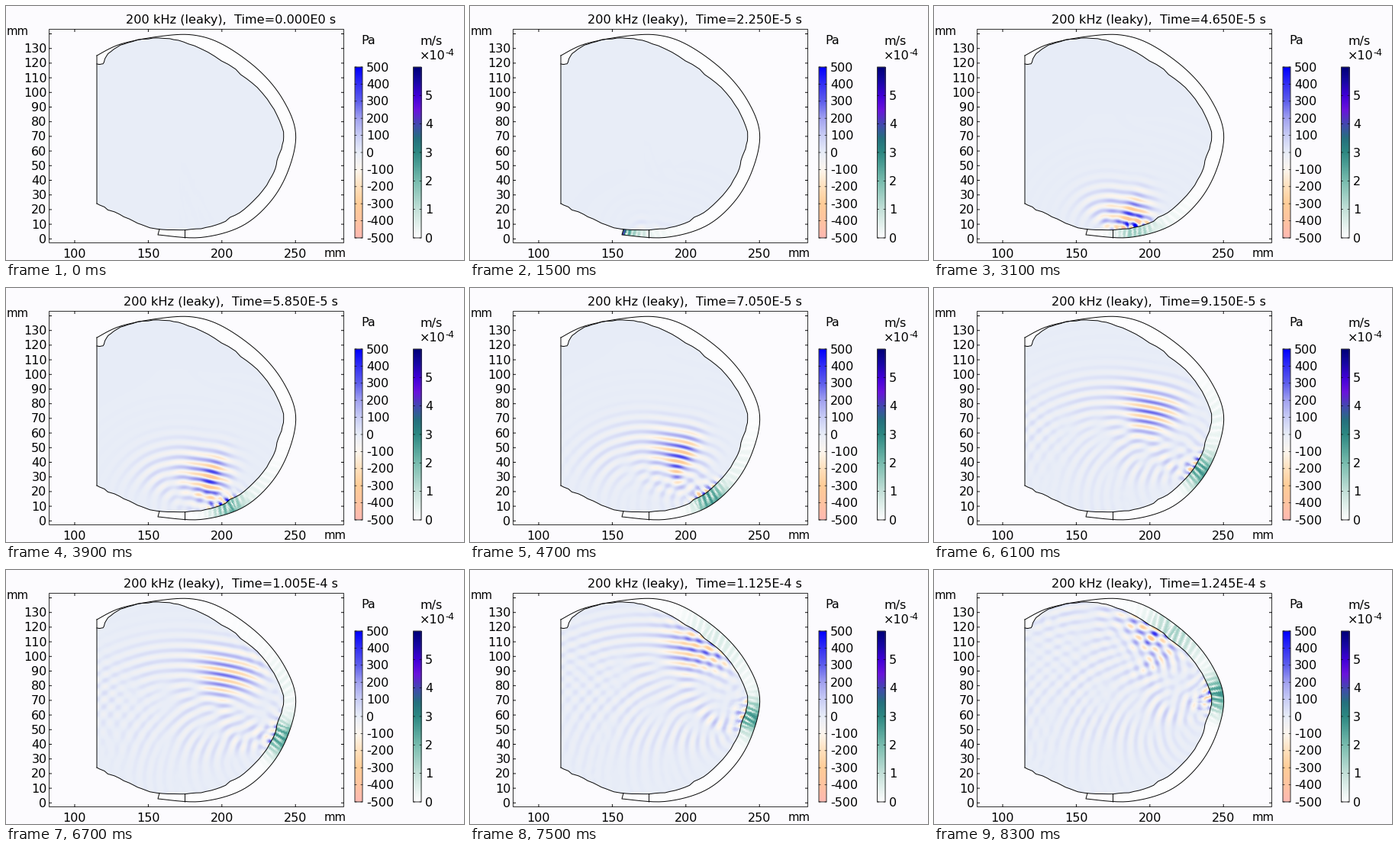
A matplotlib script that plays this animation: 600 by 333 pixels, repeating every 8.4 s.

```python
import numpy as np
import matplotlib.pyplot as plt
from matplotlib.animation import FuncAnimation
from matplotlib.colors import LinearSegmentedColormap
from matplotlib.path import Path
from matplotlib.patches import Polygon, Rectangle

W, H, FRAMES, STEP_US = 600, 333, 84, 1.5
INK = "#0a0a0a"
rng = np.random.default_rng(4)


def gauss(x, sigma):
    return np.exp(-.5 * (x / sigma)**2)


def ramp(x, a, b):
    u = np.clip((x - a) / (b - a), 0, 1)
    return u * u * (3 - 2 * u)


# ---- geometry, in stage pixels ----
def smooth(pts, n=8):
    """Catmull-Rom curve through the points."""
    pts = np.array(pts, float)
    p = np.vstack([pts[:1], pts, pts[-1:]])
    u = np.linspace(0, 1, n, endpoint=False)[:, None]
    out = []
    for a, b, c, d in zip(p, p[1:], p[2:], p[3:]):
        out.append(.5 * (2 * b + (c - a) * u + (2 * a - 5 * b + 4 * c - d) * u**2
                         + (3 * b - a - 3 * c + d) * u**3))
    return np.vstack(out + [pts[-1:]])


outer = smooth([(119, 65), (150, 50), (200, 40), (245, 38), (285, 51), (331, 84),
                (363, 123), (379.5, 167), (370, 215), (346, 257), (308, 289),
                (255, 303.5), (199, 300)])
outer = np.vstack([outer, [(201, 292.5)]])

# the inner wall is slightly rough
inner = smooth([(119, 76), (127, 75), (137, 60), (166, 46), (207, 42.5), (247, 52),
                (300, 83), (342, 121), (363, 165), (357, 197), (345, 229),
                (312, 266), (275, 287), (235, 293.5), (190, 291), (155, 276),
                (119, 259)], 6)
inner[1:-1] += rng.normal(0, .5, inner[1:-1].shape)

# ---- grid: one cell per pixel ----
X0, X1, Y0, Y1 = 117, 382, 35, 307
X, Y = np.meshgrid(np.arange(X0, X1) + .5, np.arange(Y0, Y1) + .5)
fluid = Path(inner).contains_points(np.c_[X.ravel(), Y.ravel()])
fluid = fluid.reshape(X.shape).astype(float)


def wall_coords():
    """Distance to the inner wall and arc length along it from the wedge."""
    cum = np.r_[0, np.cumsum(np.hypot(*np.diff(inner, axis=0).T))]
    start = cum[np.argmin(np.hypot(inner[:, 0] - 200, inner[:, 1] - 292.5))]
    dist, arc = np.full(X.shape, 1e9), np.zeros(X.shape)
    for c in np.arange(0, cum[-1], 1.0):
        px, py = np.interp(c, cum, inner[:, 0]), np.interp(c, cum, inner[:, 1])
        d2 = (X - px)**2 + (Y - py)**2
        near = d2 < dist
        dist[near] = d2[near]
        arc[near] = start - c
    return np.sqrt(dist), arc


D, S = wall_coords()

# ---- pressure wave in the fluid ----
SPEED, FREQ, SUB = 2.8, .21, 7      # px/us, MHz, steps per frame
GROUP = 2.28                        # speed of the packet in the shell


def crest(t):
    return 62 + GROUP * (t - 46.5)


# arc position, peak time, direction, half width, duration, strength, phase
SOURCES = [(26, 36, (0, 0), 4, 9, .5, 0),
           (57, 42.5, (.22, -.975), 18, 8.5, 1, 0)]
for s in range(75, 250, 17):
    SOURCES.append((s, 46.5 + (s - 62) / GROUP, (0, 0), 4, 6, .4,
                    rng.uniform(0, 2 * np.pi)))


def simulate():
    dt = STEP_US / SUB
    lam = SPEED * dt

    def around(a):
        return (np.roll(a, 1, 0) + np.roll(a, -1, 0)
                + np.roll(a, 1, 1) + np.roll(a, -1, 1))

    count = around(fluid)
    damp = .5 * .15 * lam * (4 - count) * fluid
    drives = []
    for s, t0, (dx, dy), width, dur, amp, phase in SOURCES:
        w = amp * gauss(S - s, width) * gauss(D, 1) * fluid
        idx = np.nonzero(w > .004)
        x, y, w = X[idx], Y[idx], w[idx]
        along = (x - np.average(x, weights=w)) * dx + (y - np.average(y, weights=w)) * dy
        drives.append((idx, w, t0 + along / SPEED, dur, phase))

    p, old = np.zeros(X.shape), np.zeros(X.shape)
    frames = [p.astype(np.float32)]
    for n in range(1, (FRAMES - 1) * SUB + 1):
        new = 2 * p - (1 - damp) * old + lam**2 * (around(p) - count * p)
        for idx, w, delay, dur, phase in drives:
            u = n * dt - delay
            new[idx] += w * gauss(u, dur) * np.sin(2 * np.pi * FREQ * u + phase)
        p, old = new / (1 + damp) * fluid, p
        if n % SUB == 0:
            frames.append(p.astype(np.float32))
    beam = frames[47][185 - Y0:235 - Y0, 240 - X0:310 - X0]
    return np.array(frames) * (350 / np.abs(beam).max())


FIELD = simulate()


def pressure(n):
    t = n * STEP_US
    late = ramp(t, 104, 124)
    env = gauss(S - crest(t), 15 + 3 * late) * ramp(S, 28, 55)
    hug = np.exp(-D / (4.5 + 4 * late)) * (560 - 250 * ramp(t, 85, 105))
    return FIELD[n] + env * hug * np.cos(2 * np.pi / 11 * (S - 2.4 * t) + .15 * D)


def velocity(n):
    t = n * STEP_US
    z = D / 6 - 1
    phase = 2 * np.pi / 13 * (S - 2.5 * t) + .5 * z
    stripes = np.sqrt(np.cos(phase)**2 + (.5 * z * np.sin(phase))**2)
    amp = 1.5 + 1.3 * ramp(S, 60, 110) + 4.5 * np.exp(-np.maximum(S, 0) / 7)
    v = amp * gauss(S - crest(t), 15) * stripes
    quick = np.abs(np.cos(2 * np.pi / 17 * (S - 4 * t) - .6 * z))
    v += .35 * gauss(S - 20 - 3 * (t - 22.5), 30) * quick * ramp(t, 4, 18)
    v += 1.1 * gauss(S - 335, 26) * gauss(t - 124, 9) * quick
    return v * (S > -4)


# ---- colours ----
def cmap(stops):
    """Evenly spaced colour stops, low to high."""
    return LinearSegmentedColormap.from_list("c", stops, N=512)


P_MAP = cmap(["#ffb9b2", "#ffc4a0", "#ffcd98", "#ffe1be", "#fdf6ee", "#e8edf8",
              "#c9cdf5", "#a2a2f0", "#5f5fec", "#3430f4", "#0000ff"])
V_MAP = cmap(["#fdfdfe", "#e0efeb", "#c3e0d8", "#9dcec3", "#78bcae", "#52a298",
              "#2d8882", "#25707e", "#4348b0", "#6a14dc", "#4200d8", "#1808a4",
              "#000078"])

# ---- stage ----
fig = plt.figure(figsize=(6, 3.33), dpi=100, facecolor="#fcfbfe")
ax = fig.add_axes([0, 0, 1, 1])
ax.set_xlim(0, W)
ax.set_ylim(H, 0)
ax.axis("off")


def label(x, y, s, size=16, ha="left"):
    return ax.text(x, y, s, fontsize=size * .72, family="DejaVu Sans",
                   color="black", ha=ha, va="baseline")


def line(xs, ys, lw=.72):
    ax.plot(xs, ys, color=INK, lw=lw, zorder=5, snap=False)


def box(x, y, w, h):
    ax.add_patch(Rectangle((x, y), w, h, fill=False, ec="#333333", lw=.72,
                           zorder=4, snap=False))


def field_image(cm, lo, hi, shape, z):
    im = ax.imshow(np.zeros(X.shape), cmap=cm, vmin=lo, vmax=hi, aspect="auto",
                   extent=(X0, X1, Y1, Y0), interpolation="nearest", zorder=z)
    im.set_clip_path(Polygon(shape, closed=True, transform=ax.transData))
    return im


shell_im = field_image(V_MAP, 0, 6, outer, 1)
fluid_im = field_image(P_MAP, -500, 500, inner, 2)

line(*inner.T)
line(*outer.T)
line([119, 119], [65, 259])
line([234.5, 234.5], [293.5, 304])

# plot frame with inward ticks on every side
L, R, T, B = 56.5, 442.5, 30.5, 310.5
box(L, T, R - L, B - T)
for k in range(15):
    y = 305.3 - 19.2 * k
    line([L, L + 3], [y, y])
    line([R - 3, R], [y, y])
    if k < 14:
        label(53.5, y + 5.5, str(10 * k), ha="right")
for k in range(4):
    x = 90 + 96.4 * k
    line([x, x], [B - 3, B])
    line([x, x], [T, T + 3])
    label(x, 330, str(100 + 50 * k), ha="center")
label(.8, 37.5, "mm", 14.7)
label(417, 329, "mm", 14.7)


def colorbar(x, w, cm, ticks):
    ax.imshow(np.linspace(1, 0, 224)[:, None], cmap=cm, vmin=0, vmax=1,
              extent=(x, x + w, 304, 80), aspect="auto", zorder=2)
    box(x, 80, w, 224)
    for y, s in ticks:
        line([x, x + 2], [y, y], .5)
        line([x + w - 2, x + w], [y, y], .5)
        label(x + w + 4.8, y + 5.7, s)


colorbar(457, 10, P_MAP,
         [(80 + 22.4 * k, str(500 - 100 * k)) for k in range(11)])
colorbar(533.5, 10.5, V_MAP, [(304 - 37.35 * k, str(k)) for k in range(6)])
label(465, 50.5, "Pa")
label(542, 50.5, "m/s")
label(541.5, 70.5, "×10")
label(575.5, 65, "-4", 12)

title = label(294.3, 22.5, "", 16.1, ha="center")
ax.set_xlim(0, W)
ax.set_ylim(H, 0)


def update(n):
    mantissa, exponent = f"{n * STEP_US * 1e-6:.3E}".split("E")
    title.set_text(f"200 kHz (leaky),  Time={mantissa}E{int(exponent)} s")
    fluid_im.set_data(pressure(n))
    shell_im.set_data(velocity(n))
    return title, fluid_im, shell_im


anim = FuncAnimation(fig, update, frames=FRAMES, interval=100, repeat=True,
                     repeat_delay=0, blit=False)
plt.show()
```
